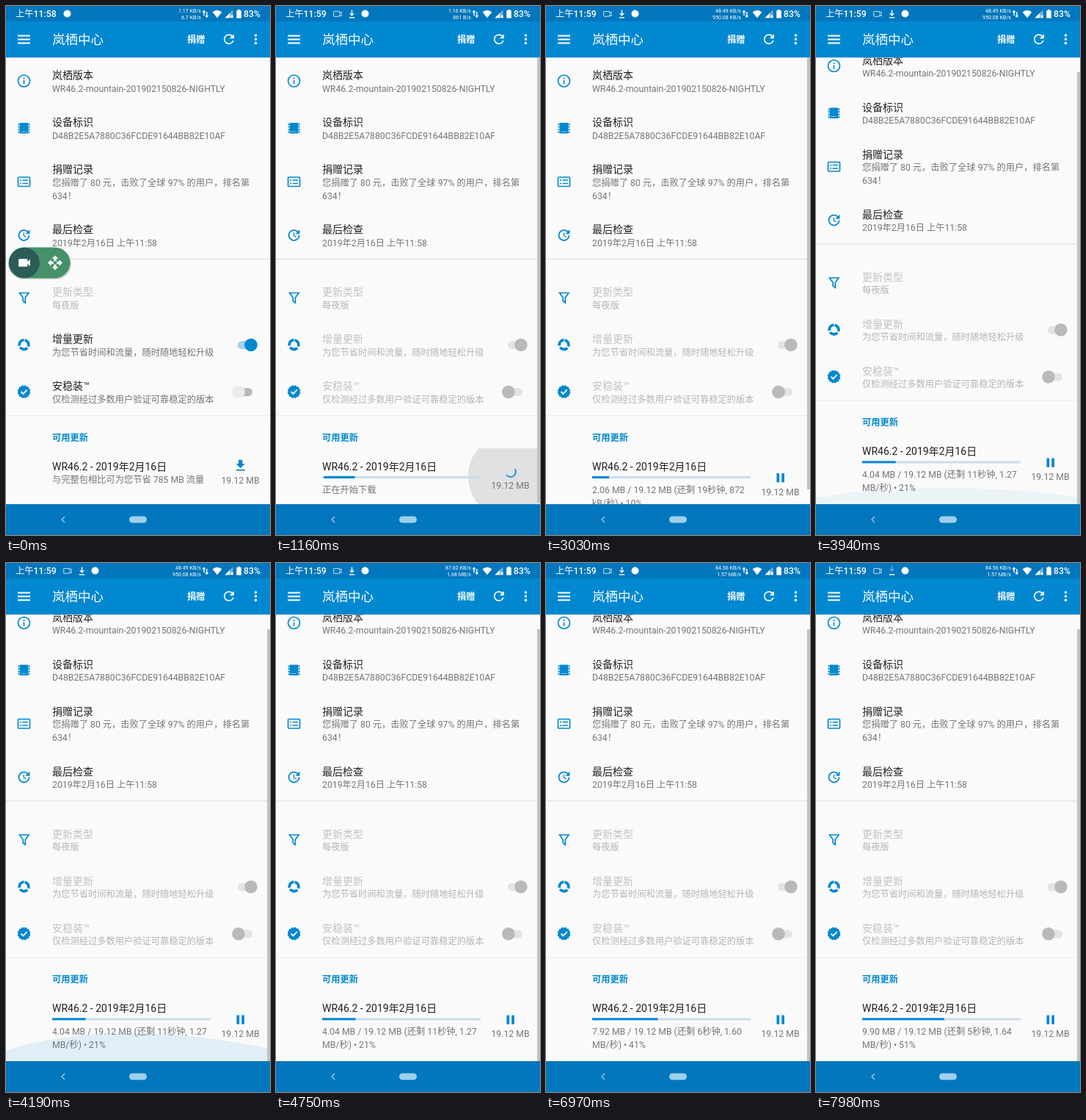
Animation, 360 px wide and 720 px high, one loop 8 s. Source, as an HTML page:

```html
<!DOCTYPE html>
<html lang="zh-CN">
<head>
<meta charset="utf-8">
<title>系统更新</title>
<style>
  :root { --accent: #0288d1; --paper: #fafafa; }
  html, body { margin: 0; width: 100%; height: 100%; overflow: hidden; background: var(--paper); }
  svg { display: block; }
  text { font: 12.25px Roboto, "Noto Sans CJK SC", "Noto Sans CJK", sans-serif; fill: #757575; white-space: pre; }
  .title { font-size: 14px; fill: #212121; }
  .off .title { fill: #c2c2c2; }
  .off text { fill: #b4b4b4; }
  .section { font-weight: 700; fill: var(--accent); }
  .bar text { fill: #fff; font-weight: 500; }
  .bar .heading { font-size: 17.5px; }
  .bar .action { font-weight: 700; }
  .bar .speed { font-size: 7.1px; font-weight: 400; text-anchor: end; }
  .accent { fill: var(--accent); }
  .paper { fill: var(--paper); }
  .line { fill: none; stroke: var(--accent); stroke-width: 1.7; }
  .white { fill: #fff; }
  .white-line { fill: none; stroke: #fff; stroke-width: 1.4; }

  .scroll, .thumb, .glow, .pill, .ripple, .sweep { animation: 8s linear infinite; }
  .scroll { animation-name: scroll; }
  .thumb { animation-name: thumb; }
  .glow { animation-name: glow; transform-origin: 180px 678px; }
  .pill { animation-name: pill; }
  .ripple { animation-name: ripple; transform-origin: 320px 640px; }
  .sweep { animation-name: sweep; }
  .spin { animation: spin 1.33333s linear infinite; transform-origin: 320px 634px; }
  .arrow { animation: arrow 1.2s step-end infinite; }

  @keyframes scroll {
    0%, 43.5% { transform: none; animation-timing-function: ease-out; }
    48.5%, 100% { transform: translateY(-20.5px); }
  }
  @keyframes thumb {
    0%, 43.5% { transform: none; animation-timing-function: ease-out; }
    48.5%, 100% { transform: translateY(20px); }
  }
  @keyframes glow {
    0%, 47.5% { opacity: 0; transform: scaleY(0); }
    50.5%, 52.4% { opacity: 1; transform: none; }
    58%, 100% { opacity: 0; transform: scaleY(.2); }
  }
  @keyframes pill {
    0%, 3% { opacity: 1; transform: none; }
    7%, 100% { opacity: 0; transform: translateX(-20px); }
  }
  @keyframes ripple {
    0%, 7.5% { opacity: 0; transform: scale(.2); }
    8.5% { opacity: 1; }
    12%, 14.5% { opacity: 1; transform: none; }
    18.5%, 100% { opacity: 0; transform: none; }
  }
  @keyframes sweep {
    0%, 10.625% { transform: translateX(-12.5px) scaleX(5); }
    20%, 100% { transform: translateX(175px) scaleX(95); }
  }
  @keyframes spin { to { transform: rotate(360deg); } }
  @keyframes arrow {
    0% { opacity: .4; transform: translateY(2px); }
    17% { opacity: 1; transform: none; }
    59% { opacity: .4; transform: translateY(-2px); }
    75% { opacity: 1; transform: none; }
  }
</style>
</head>
<body>
<svg width="360" height="720" viewBox="0 0 360 720">
  <defs>
    <path id="videocam" d="M17 10.5V7a1 1 0 0 0-1-1H4a1 1 0 0 0-1 1v10a1 1 0 0 0 1 1h12a1 1 0 0 0 1-1v-3.5l4 4v-11z"/>
    <path id="download" d="M19 9h-4V3H9v6H5l7 7 7-7zM5 18v2h14v-2z"/>
    <clipPath id="trackClip"><rect x="63" y="639.5" width="216" height="3.5"/></clipPath>
    <clipPath id="rowClip"><rect y="602" width="360" height="76"/></clipPath>
  </defs>
  <rect class="paper" width="360" height="720"/>

  <g class="scroll">
    <g clip-path="url(#rowClip)"><circle class="ripple" cx="320" cy="640" r="58" fill="#dfe1e3"/></g>
    <g id="rows"></g>

    <!-- preference icons -->
    <circle class="line" cx="24.5" cy="102" r="8"/>
    <path class="line" d="M24.5 101v5.2M24.5 97.6v1.8"/>
    <rect class="accent" x="18.5" y="159" width="12" height="14.5" rx="1"/>
    <path class="line" stroke-dasharray="2 1.6" d="M17.3 160v13M31.7 160v13"/>
    <path d="M21 171h7" stroke="#fafafa" stroke-dasharray="1.3 1.3"/>
    <rect class="line" x="16.5" y="233" width="16" height="12.5" rx="1"/>
    <path class="line" d="M19 237h2M19 241.5h2M22.5 237h7.5M22.5 241.5h7.5"/>
    <path class="accent" transform="translate(14 301.5) scale(.875)" d="M21 10.12h-6.78l2.74-2.82c-2.73-2.7-7.15-2.8-9.88-.1-2.73 2.71-2.73 7.08 0 9.79s7.15 2.71 9.88 0C18.32 15.65 19 14.08 19 12.1h2c0 1.98-.88 4.55-2.64 6.29-3.51 3.48-9.21 3.48-12.72 0-3.5-3.47-3.53-9.11-.02-12.58s9.14-3.47 12.65 0L21 3zM12.5 8v4.25l3.5 2.08-.72 1.21L11 13V8z"/>
    <path class="line" d="M18.5 390.5h12.5l-4.7 6.5v7l-3.1-2.4V397z"/>
    <circle class="line" cx="24.5" cy="461" r="6.3" style="stroke-width:3.8" stroke-dasharray="11 2.195" transform="rotate(-80 24.5 461)"/>
    <g class="accent" id="badge"></g>
    <path d="M20.5 525l2.9 2.9 5.3-5.5" fill="none" stroke="#fafafa" stroke-width="1.8"/>

    <path d="M0 344.5H360" stroke="#d6dae2"/>
    <path d="M0 557.5H360" stroke="#e9ebee"/>

    <g id="switchOn"><rect x="316" y="456" width="24" height="11" rx="5.5"/><circle cx="334" cy="461.3" r="8.8"/></g>
    <g id="switchOff"><rect x="311" y="520" width="25" height="11" rx="5.5"/><circle cx="317" cy="525.3" r="8.8"/></g>

    <text class="section" x="63" y="591.5">可用更新</text>
    <text class="title" x="63" y="631.5">WR46.2 - 2019年2月16日</text>
    <g id="progress">
      <rect x="63" y="639.8" width="216" height="3.2" fill="#cbdfec"/>
      <g clip-path="url(#trackClip)">
        <g id="sweep"><rect class="sweep accent" y="639.8" width="1" height="3.2"/></g>
        <rect id="fill" class="accent" x="63" y="639.8" height="3.2"/>
      </g>
    </g>
    <text id="status1" x="63"></text>
    <text id="status2" x="63" y="680.5"></text>

    <use id="getIcon" class="accent" href="#download" transform="translate(309.2 615) scale(.875)"/>
    <g id="spinner"><g class="spin"><circle class="line" cx="320" cy="634" r="7" stroke-dasharray="21.4 22.6" transform="rotate(12 320 634)"/></g></g>
    <path id="pauseIcon" class="accent" d="M314.5 636h3.7v12.2h-3.7zM321.3 636h3.7v12.2h-3.7z"/>
    <text id="size" x="319.5" text-anchor="middle">19.12 MB</text>
  </g>

  <path class="glow" d="M0 663Q150 618 360 661V678H0Z" fill="#0288d1" fill-opacity=".1"/>
  <g class="thumb"><rect id="thumb" x="356" y="70" width="4" fill="#c3c3c3"/></g>

  <g class="pill">
    <rect x="3" y="329.5" width="86" height="42.5" rx="21.2" fill="#b8bcb9" opacity=".6"/>
    <rect x="3.5" y="328.5" width="84" height="42" rx="21" fill="#459168"/>
    <circle cx="25" cy="349.5" r="20.8" fill="#2c5b58"/>
    <use class="white" href="#videocam" transform="translate(14.5 339) scale(.875)"/>
    <g class="white" id="move"></g>
  </g>

  <g class="bar">
    <rect width="360" height="21" fill="#0277bd"/>
    <rect y="21" width="360" height="49" fill="#0288d1"/>
    <path d="M0 70.5H360" stroke="#c4d4de" opacity=".6"/>

    <text id="clock" x="13" y="15.3"></text>
    <g id="recording">
      <use href="#videocam" class="white-line" stroke-width="2" transform="translate(77 4) scale(.57)"/>
    </g>
    <g id="downloading">
      <path class="white-line" d="M99.8 15.8h7.4"/>
      <path class="arrow white-line" d="M103.5 5.5v7M100.8 10l2.7 2.7 2.7-2.7"/>
    </g>
    <circle id="notice" class="white" cy="10.5" r="5"/>
    <text id="up" class="speed" x="266" y="9"></text>
    <text id="down" class="speed" x="266" y="17.6"></text>
    <path class="white-line" d="M270 13V6.5M268.2 8.4l1.8-1.9 1.8 1.9M273.8 8V15M272 13.1l1.8 1.9 1.8-1.9"/>
    <path class="white" d="M288 16.3L281.6 8.2Q288 3.2 294.4 8.2Z"/>
    <path class="white" opacity=".45" d="M298.5 16.2L309.5 5.2V16.2Z"/>
    <path class="white" d="M298.5 16.2L305 9.7V16.2Z"/>
    <path class="white-line" d="M306.5 12.8l3.2 3.2M309.7 12.8l-3.2 3.2"/>
    <path class="white" d="M314.3 6h2V4.8h2.6V6h2v10.5h-6.6z"/>
    <text x="324" y="15.3">83%</text>

    <path d="M16 40.5h17M16 45.5h17M16 50.5h17" stroke="#fff" stroke-width="1.9"/>
    <text class="heading" x="63" y="51.7">岚栖中心</text>
    <text class="action" x="247" y="50">捐赠</text>
    <path class="white" transform="translate(293.5 34.7) scale(.875)" d="M17.65 6.35A7.96 7.96 0 0 0 12 4a8 8 0 1 0 7.73 10h-2.08A6 6 0 1 1 12 6c1.66 0 3.14.69 4.22 1.78L13 11h7V4z"/>
    <path d="M340.5 40v0M340.5 45.3v0M340.5 50.6v0" stroke="#fff" stroke-width="3.6" stroke-linecap="round"/>

    <rect y="678" width="360" height="42" fill="#0277bd"/>
    <path d="M80 695l-4 4 4 4" fill="none" stroke="#a5d0ea" stroke-width="1.2"/>
    <rect x="168" y="694.5" width="24" height="9" rx="4.5" fill="#9dd0ec"/>
  </g>
</svg>

<script>
  const LOOP = 8000;
  const $ = id => document.getElementById(id);
  // Visibility, unlike display, leaves running CSS animations in phase.
  const show = (id, on) => { $(id).style.visibility = on ? "visible" : "hidden"; };
  const latest = (steps, t) => steps.filter(step => step[0] <= t).pop();

  // First-line centre, title, detail lines, id
  const rows = [
    [94, "岚栖版本", ["WR46.2-mountain-201902150826-NIGHTLY"]],
    [158, "设备标识", ["D48B2E5A7880C36FCDE91644BB82E10AF"]],
    [222, "捐赠记录", ["您捐赠了 80 元，击败了全球 97% 的用户，排名第", "634！"]],
    [304, "最后检查", ["2019年2月16日 上午11:58"]],
    [389, "更新类型", ["每夜版"], "channel"],
    [453, "增量更新", ["为您节省时间和流量，随时随地轻松升级"], "delta"],
    [517, "安稳装™", ["仅检测经过多数用户验证可靠稳定的版本"], "steady"]
  ];
  $("rows").innerHTML = rows.map(([y, title, lines, id = ""]) =>
    `<g id="${id}"><text class="title" x="63" y="${y + 5.2}">${title}</text>` +
    lines.map((line, i) => `<text x="63" y="${y + 22.6 + i * 18}">${line}</text>`).join("") + "</g>").join("");
  $("channel").classList.add("off");
  $("badge").innerHTML = [0, 30, 60].map(a =>
    `<rect x="17.7" y="518.2" width="13.6" height="13.6" rx="1.5" transform="rotate(${a} 24.5 525)"/>`).join("");
  $("move").innerHTML = [0, 90, 180, 270].map(a =>
    `<path transform="rotate(${a} 67 349.5)" d="M67 339.5l4.4 4.5h-2.7v3.2h-3.4V344h-2.7z"/>`).join("");

  const speeds = [
    [0, "1.17 KB/s", "6.7 KB/s"],
    [400, "1.16 KB/s", "861 B/s"],
    [2400, "48.49 KB/s", "950.08 KB/s"],
    [4400, "87.62 KB/s", "1.68 MB/s"],
    [6400, "84.56 KB/s", "1.57 MB/s"]
  ];
  // Start, megabytes, percent, seconds left, speed, unit
  const reports = [
    [1600, "0.19", 1, 38, "504", "kB"],
    [2500, "2.06", 10.6, 19, "872", "kB"],
    [3750, "4.04", 21.1, 11, "1.27", "MB"],
    [5000, "5.95", 31.1, 8, "1.56", "MB"],
    [6200, "7.92", 41.4, 6, "1.60", "MB"],
    [7400, "9.90", 51.8, 5, "1.64", "MB"]
  ];

  function paintSwitch(id, track, knob) {
    const [rail, dot] = $(id).children;
    rail.setAttribute("fill", track);
    dot.setAttribute("fill", knob);
  }

  function render(t) {
    const started = t >= 780, recording = t >= 400;
    const report = latest(reports, t);
    const [, up, down] = latest(speeds, t);

    $("clock").textContent = recording ? "上午11:59" : "上午11:58";
    $("up").textContent = up;
    $("down").textContent = down;
    $("notice").setAttribute("cx", started ? 121.5 : recording ? 103 : 83.5);
    show("recording", recording);
    show("downloading", started);

    for (const id of ["delta", "steady"]) $(id).classList.toggle("off", started);
    paintSwitch("switchOn", started ? "#e4e4e4" : "#a2d2ee", started ? "#b9b9b9" : "#0288d1");
    paintSwitch("switchOff", started ? "#e4e4e4" : "#b9b9b9", started ? "#b9b9b9" : "#ececec");

    show("getIcon", !started);
    show("spinner", started && !report);
    show("pauseIcon", report);
    show("progress", started);
    show("sweep", started && !report);
    show("fill", report);
    show("thumb", started);
    $("thumb").setAttribute("height", report ? 588 : 606);
    $("size").setAttribute("y", report ? 665.5 : started ? 656.5 : 649.5);
    $("status1").setAttribute("y", started ? 662.5 : 648.7);

    let lines = [started ? "正在开始下载" : "与完整包相比可为您节省 785 MB 流量", ""];
    if (report) {
      const [, done, percent, left, rate, unit] = report;
      lines = [`${done} MB / 19.12 MB (还剩 ${left}秒钟, ${rate}`, `${unit}/秒) • ${Math.floor(percent)}%`];
    }
    $("status1").textContent = lines[0];
    $("status2").textContent = lines[1];
    $("fill").setAttribute("width", report ? 216 * report[2] / 100 : 0);
  }

  let origin;
  function tick(now) {
    origin ??= now;
    render((now - origin) % LOOP);
    requestAnimationFrame(tick);
  }
  render(0);
  requestAnimationFrame(tick);
</script>
</body>
</html>
```
